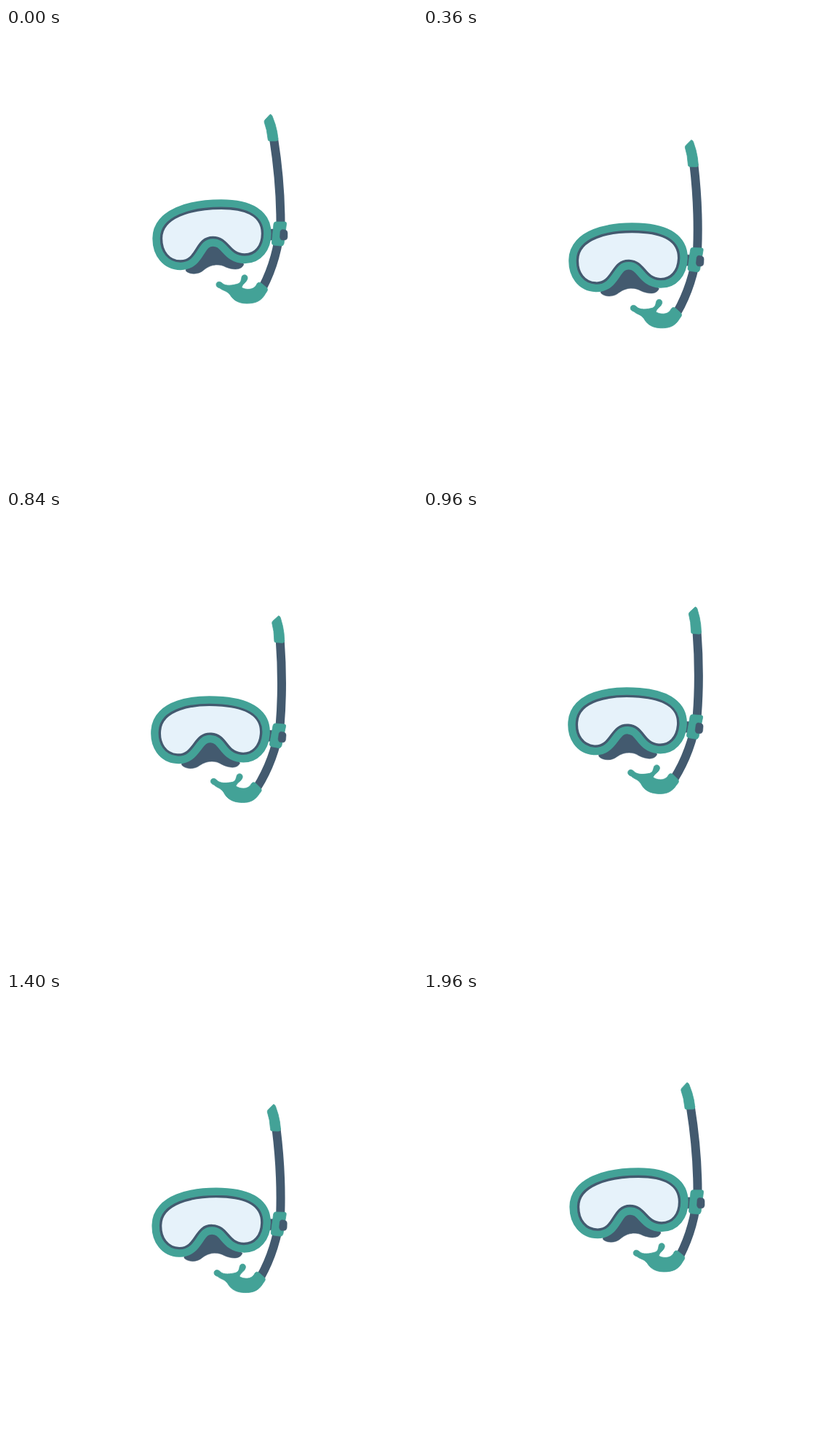
Animation of 565 by 623 pixels, one loop 2 s. Source, as an HTML page:

```html
<!DOCTYPE html>
<html lang="en">
<head>
<meta charset="utf-8">
<title>Snorkel mask</title>
<style>
  html, body { margin: 0; width: 100%; height: 100%; overflow: hidden; background: #fff; }
  svg { display: block; width: 565px; height: 623px; }
  .teal { fill: #43a297; stroke: #43a297; stroke-width: .8; }
  .dark { fill: #435a6f; stroke: #435a6f; stroke-width: .5; }
  .line { fill: none; stroke: #435a6f; stroke-width: 12; }
</style>
</head>
<body>
<svg viewBox="0 0 565 623">
  <defs>
    <path id="lens" d="M213.5 289 C213 260 253 247.3 296 247.3 C334 247.3 352.5 260 352.5 282
      C352.5 299 343 311 328 311 C306 311 306 287.500 284.5 287.500 C260 287.500 264 320 240 320
      C224 320 213.5 307 213.5 289Z"/>
  </defs>
  <g id="gear">
    <!-- tube -->
    <path class="line" d="M368 152 C374 190 377.5 230 377.5 268 C375 300 366 331 353 356"/>
    <path class="teal" d="M363 118.500 Q365 118.500 366 121 L370 132 Q373 142 374 152 Q374 155 371 155
      L362 155 Q360 155 360 152 Q359 140 355 129 Q355 127 356 126Z"/>
    <!-- nose piece -->
    <path class="dark" d="M284 290 L262 318 C250 328 245 331 248 334 C254 339 266 338 272 332
      C283 323 295 324 302 328 C312 332 324 333 327 324 L312 312Z"/>
    <rect class="dark" x="358" y="276" width="12" height="15"/>
    <!-- mask -->
    <use href="#lens" fill="#43a297" stroke="#43a297" stroke-width="24.3" stroke-linejoin="round"/>
    <use href="#lens" fill="#e6f2fa" stroke="#435a6f" stroke-width="3.4"/>
    <!-- clip -->
    <path class="teal" d="M371 266 L383 266 Q386 266 385.500 269 L382 296 Q381 299.500 378 299
      L368 298 Q365 297 365.500 294 L368 269 Q368.500 266 371 266Z"/>
    <path class="dark" d="M380 276.500 L384 277 Q387 278 387 281 L387 287 Q386.500 291 383 291
      L379 291 Q377 290 376.500 287 L377 279 Q378 276.500 380 276.500Z"/>
    <!-- mouthpiece -->
    <path class="teal" d="M289 352 C289 348 294 347 297 350 C302 355 312 353 319 351
      C323 349 323 347 324 342 C325 337 333 338 332 344 C331 349 325 351 324 356
      C328 359 341 361 345 351 C347 348 350 349 352 351 L358 356 C361 359 359 361 357 364
      C351 375 343 378 331 378 C317 378 311 371 308 366 C303 360 299 361 294 357
      C291 356 289 355 289 352Z"/>
  </g>
</svg>
<script>
  const LOOP = 2000, STEP = 40;
  const gear = document.getElementById('gear');

  // vertical bob: [time, offset]
  const bob = [[0, 0], [360, 32.3], [580, 35], [840, 20.6], [1000, 7], [1120, 17.7],
               [1400, 33.4], [1560, 34.3], [1720, 34.2], [1960, 6]];
  const n = bob.length;

  function key(i) {
    const lap = Math.floor(i / n), [t, y] = bob[i - lap * n];
    return [t + lap * LOOP, y];
  }

  function slope(i) {
    const [a, b] = [key(i), key(i + 1)];
    return (b[1] - a[1]) / (b[0] - a[0]);
  }

  // tangent that never overshoots a key
  function tangent(i) {
    const a = slope(i - 1), b = slope(i);
    return a * b <= 0 ? 0 : 2 * a * b / (a + b);
  }

  function height(t) {
    let i = n - 1;
    while (bob[i][0] > t) i--;
    const [t0, y0] = key(i), [t1, y1] = key(i + 1);
    const d = t1 - t0, p = (t - t0) / d, q = 1 - p;
    return y0 * q * q * (1 + 2 * p) + y1 * p * p * (3 - 2 * p)
      + d * p * q * (tangent(i) * q - tangent(i + 1) * p);
  }

  function tilt(t) {
    return 2.25 + 2.5 * Math.cos(2 * Math.PI * (t - 850) / LOOP);
  }

  function draw(now) {
    const t = Math.floor((now % LOOP) / STEP) * STEP;
    gear.setAttribute('transform',
      `translate(0 ${height(t).toFixed(2)}) rotate(${tilt(t).toFixed(3)} 294 261)`);
  }

  let start;
  function tick(now) {
    start ??= now;
    draw(now - start);
    requestAnimationFrame(tick);
  }
  draw(0);
  requestAnimationFrame(tick);
</script>
</body>
</html>
```
